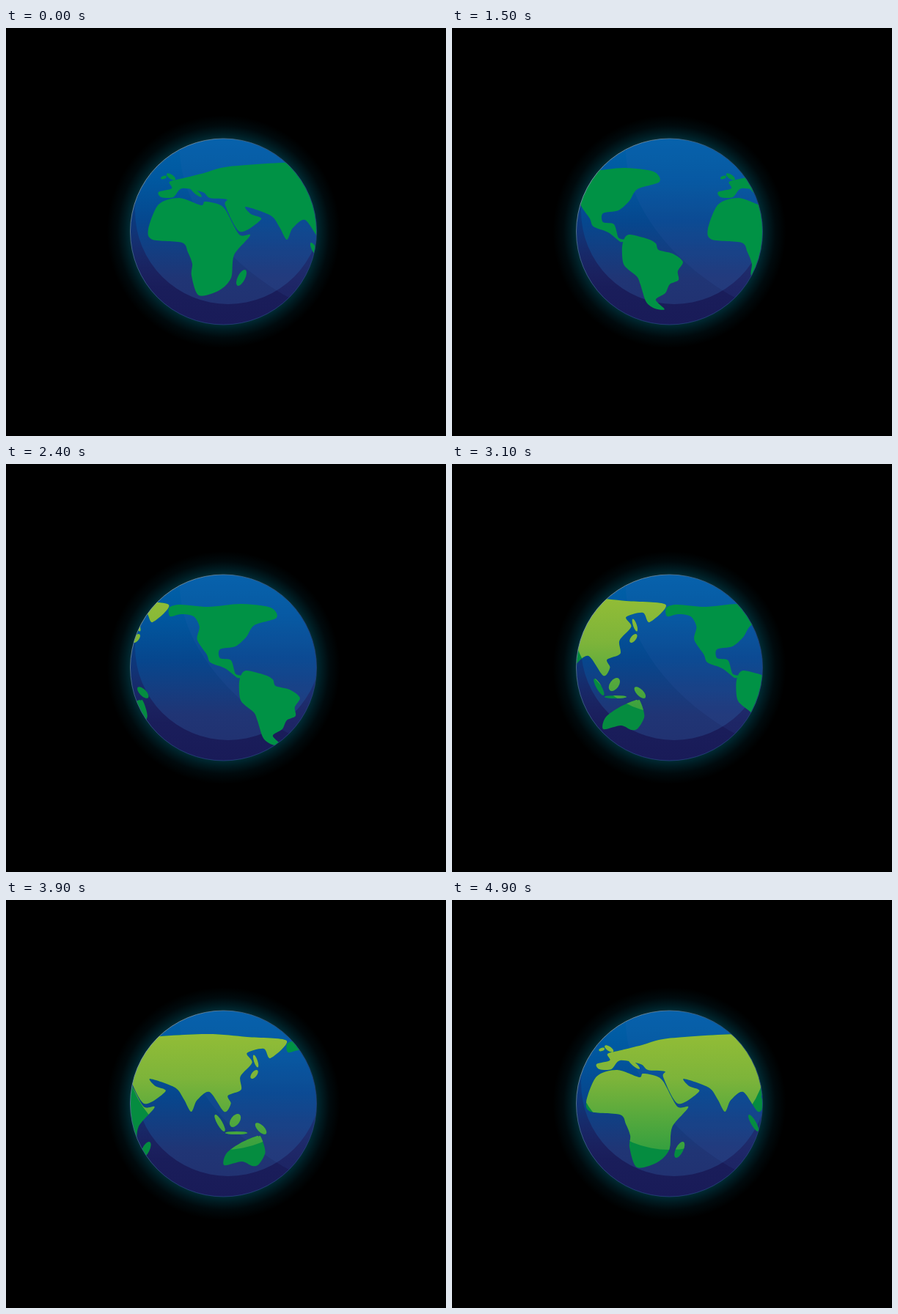
Write an HTML page with a canvas that moves like this. It is 600 by 557 pixels and loops after 5000 ms.

```html
<!DOCTYPE html>
<html lang="en">
<head>
<meta charset="utf-8">
<title>Turning globe</title>
<style>
html, body { margin: 0; width: 100%; height: 100%; overflow: hidden; background: #000; }
canvas { display: block; }
</style>
</head>
<body>
<canvas id="stage" width="600" height="557"></canvas>
<script>
const ctx = document.getElementById('stage').getContext('2d');
const CX = 296.5, CY = 278, R = 127, GLOW = 32;
const LOOP = 5000, STEP = 100, MAP_WIDTH = 532;
const land = new Path2D();

// Closed smooth curve through a few coast points, given as x, y pairs.
function coast(...p) {
  const n = p.length / 2;
  const at = i => p.slice((i + n) % n * 2).slice(0, 2);
  land.moveTo(...at(0));
  for (let i = 0; i < n; i++) {
    const [a, b, c, d] = [at(i - 1), at(i), at(i + 1), at(i + 2)];
    land.bezierCurveTo(
      b[0] + (c[0] - a[0]) / 7, b[1] + (c[1] - a[1]) / 7,
      c[0] - (d[0] - b[0]) / 7, c[1] - (d[1] - b[1]) / 7, c[0], c[1]);
  }
  land.closePath();
}

function island(x, y, length, width, angle) {
  const shape = new Path2D();
  shape.ellipse(x, y, length, width, angle, 0, 2 * Math.PI);
  land.addPath(shape);
}

// Eurasia
coast(208,224, 226,219, 223,210, 242,205, 270,198, 305,189, 402,183, 459,187,
  513,192, 491,216, 482,203, 459,209, 466,222, 450,241, 451,259, 433,267,
  437,278, 428,289, 408,262, 391,273, 383,289, 373,272, 361,256, 327,244,
  334,254, 348,261, 319,278, 299,242, 301,234, 278,232, 268,224, 240,219,
  228,231, 212,231);
// Africa
coast(194,275, 200,289, 240,293, 248,306, 254,322, 253,338, 263,365, 291,358,
  307,341, 311,310, 333,283, 318,282, 299,248, 288,240, 271,237, 266,242,
  236,232, 208,241);
// Australia
coast(428,362, 431,346, 450,332, 474,322, 471,331, 477,322, 484,344, 475,361,
  466,363, 452,357);
// North America
coast(-18,196, -3,192, 35,195, 80,191, 120,196, 128,210, 98,220, 87,236,
  72,249, 51,253, 51,265, 66,268, 72,286, 80,289, 75,292, 58,279, 38,271,
  33,260, 20,240, 23,222, 15,208, -2,205, -17,208);
// South America
coast(79,290, 87,282, 112,288, 123,294, 127,303, 146,308, 160,319, 153,332,
  154,344, 142,350, 136,362, 123,371, 135,384, 122,383, 110,374, 102,350,
  97,339, 80,324, 77,305);

island(215, 204, 4, 2.2, -.3);    // Ireland
island(225, 203, 7, 3, .6);       // Britain
island(259, 224, 10, 2.5, .7);    // Italy
island(321, 341, 12, 5, -1.1);    // Madagascar
island(471, 220, 9, 2.5, 1.25);   // Japan
island(469, 238, 7, 3.5, -.9);
island(422, 304.5, 13, 3.5, 1.05); // Sumatra
island(443, 301, 10, 6, -.95);    // Borneo
island(444.5, 318, 15, 2, 0);     // Java
island(478, 312, 10, 4.5, .8);    // New Guinea

function fade(gradient, ...stops) {
  stops.forEach(([at, color]) => gradient.addColorStop(at, color));
  return gradient;
}
const vertical = (y0, y1, ...stops) => fade(ctx.createLinearGradient(0, y0, 0, y1), ...stops);

const glow = fade(ctx.createRadialGradient(CX, CY, R, CX, CY, R + GLOW),
  [0, '#002a33'], [.25, '#001a20'], [.55, '#000a0d'], [1, '#000']);
const sea = vertical(151, 405, [0, '#0062aa'], [.22, '#0058a0'], [.45, '#06478e'], [.75, '#203575'], [1, '#22306f']);
const shade = vertical(200, 405, [0, 'rgba(25,27,88,.1)'], [.4, 'rgba(25,27,88,.4)'], [.75, 'rgba(25,27,88,.9)'], [1, '#191b58']);
const sunny = vertical(180, 340, [0, '#93bd36'], [.4, '#7db43a'], [1, '#36a03f']);
const rim = fade(ctx.createLinearGradient(200, 180, 320, 300), [0, '#9aa9b5'], [.4, '#4a6d92'], [1, '#26407c']);

function circle(x, y, r) {
  ctx.beginPath();
  ctx.arc(x, y, r, 0, 2 * Math.PI);
}

function fill(color, ...shape) {
  ctx.fillStyle = color;
  ctx.fill(...shape);
}

function drawSea() {
  fill(sea);

  // Crescent of shadow
  ctx.beginPath();
  ctx.rect(160, 140, 280, 280);
  ctx.arc(303, 250, R, 0, 2 * Math.PI);
  fill(shade, 'evenodd');

  // Faint sheen on the upper right
  ctx.beginPath();
  ctx.moveTo(238, 150);
  ctx.bezierCurveTo(228, 225, 290, 315, 386, 368);
  ctx.lineTo(430, 400);
  ctx.lineTo(430, 150);
  fill('rgba(60,100,180,.12)');
}

// Turned distance: a steady spin that lags a little past halfway.
function turned(t) {
  const u = t / LOOP;
  return MAP_WIDTH * u - 19.5 * Math.sin(Math.PI * u ** 1.5) ** 2;
}

function draw(t) {
  const x = turned(t);
  ctx.fillStyle = '#000';
  ctx.fillRect(0, 0, 600, 557);
  circle(CX, CY, R + GLOW);
  fill(glow);

  ctx.save();
  circle(CX, CY, R);
  ctx.clip();
  drawSea();
  ctx.translate(x, 0);
  fill('#009245', land);

  // The following map is sunlit inside a raised disc
  ctx.translate(-MAP_WIDTH, 0);
  fill('#058c40', land);
  circle(297 - x + MAP_WIDTH, 208, 133);
  ctx.clip();
  fill(sunny, land);
  ctx.restore();

  circle(CX, CY, R);
  ctx.strokeStyle = rim;
  ctx.lineWidth = .8;
  ctx.stroke();
}

const start = performance.now();
function tick() {
  const t = (performance.now() - start) % LOOP;
  draw(Math.floor(t / STEP) * STEP);
  requestAnimationFrame(tick);
}
tick();
</script>
</body>
</html>
```
